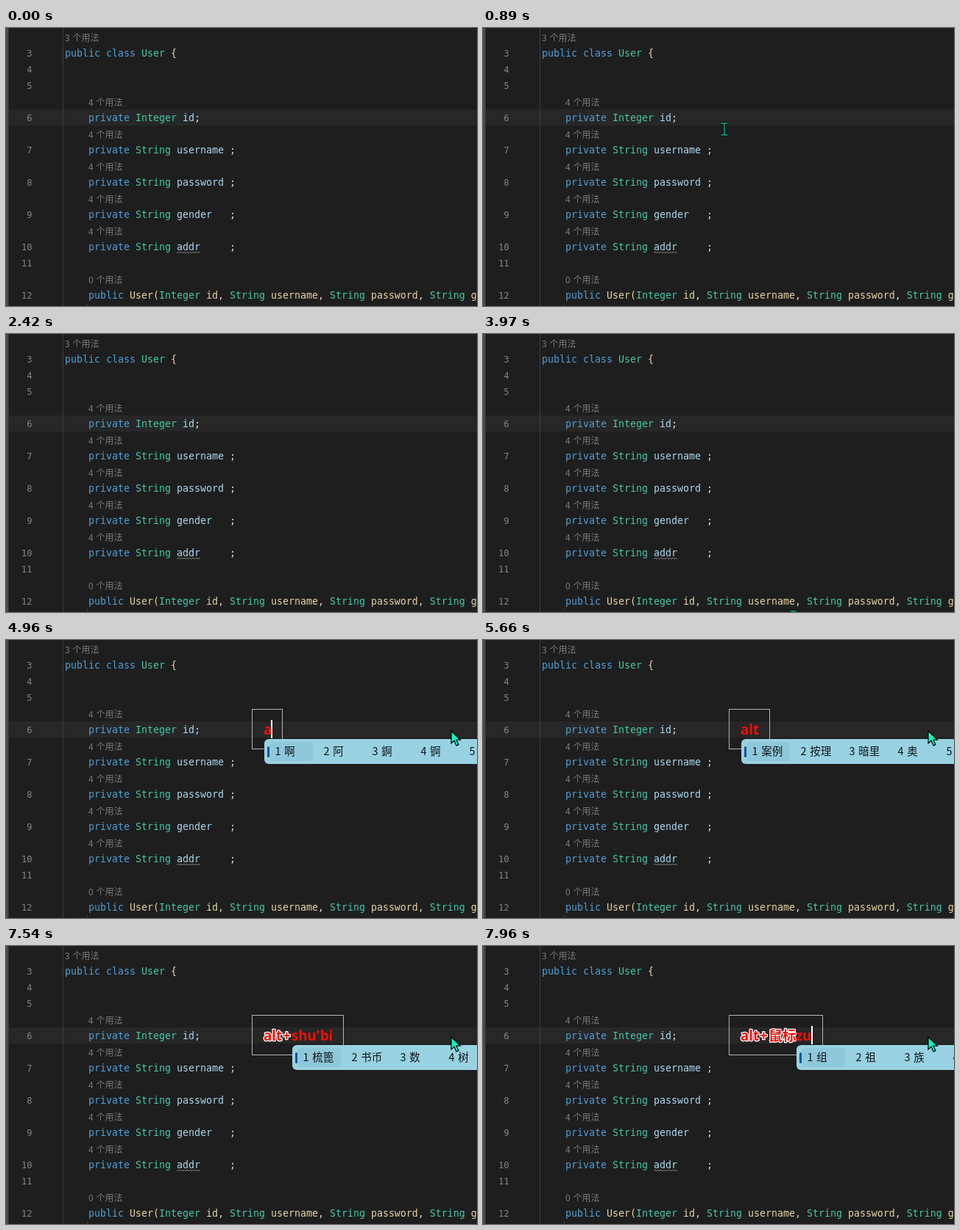
These frames come from a looping animation (640 by 379 pixels, 8000 ms). An HTML page:

```html
<!DOCTYPE html>
<html lang="zh-CN">
<head>
<meta charset="utf-8">
<style>
html, body { margin: 0; width: 100%; height: 100%; overflow: hidden; background: #1e1e1e; }
svg { display: block; }
text { white-space: pre; }
.code { font: 13.29px "DejaVu Sans Mono", monospace; fill: #d8d8d8; }
.num { font: 12px "DejaVu Sans Mono", monospace; fill: #858585; text-anchor: end; }
.hint { font: 12px "Noto Sans CJK SC", sans-serif; fill: #7b7b7b; word-spacing: 1.2px; }
.kw { fill: #4e9fd6; }
.type { fill: #45c8a6; }
.ctor { fill: #e6d6a2; }
.var { fill: #a8daf2; }
.note { font: bold 18.67px "Noto Sans", "Noto Sans CJK SC", sans-serif; fill: #f01008; }
.done { stroke: #fff; stroke-width: 2.6; stroke-linejoin: round; paint-order: stroke; }
.cand { font: 14.5px "Noto Sans CJK SC", sans-serif; fill: #101418; word-spacing: 1.5px; }
</style>
</head>
<body>
<svg width="640" height="379" viewBox="0 0 640 379">
  <rect width="640" height="379" fill="#1e1e1e"/>
  <rect x="4" y="111" width="636" height="22" fill="#272727"/>
  <rect width="3" height="379" fill="#48494b"/>
  <rect x="3" width="1" height="379" fill="#333"/>
  <rect x="77" width="1" height="379" fill="#3d3d3d"/>
  <rect x="110" y="375" width="1" height="4" fill="#3d3d3d"/>
  <g id="editor"></g>
  <path id="wave" fill="none" stroke="#8c8c8c" stroke-width=".9"/>
  <g id="note">
    <rect id="frame" x="334.5" y="94.5" height="54" fill="none" stroke="#b4b4b4"/>
    <text id="done" class="note done" y="129"></text>
    <text id="typing" class="note" y="129"></text>
    <rect id="caret" y="109" width="2" height="25" fill="#fff"/>
    <g id="panel">
      <rect y="135" width="400" height="34" rx="6" fill="#98d2e2"/>
      <rect x="7" y="139" width="59" height="26" rx="5" fill="#8fc8da"/>
      <rect x="4" y="145" width="3" height="15" rx="1.5" fill="#0b56a5"/>
      <g id="cands"></g>
    </g>
  </g>
  <g id="mouse">
    <g id="beam" fill="none" stroke-linecap="square">
      <path d="M-4-8h3l1 1 1-1h3M0-7V7M-4 8h3l1-1 1 1h3" stroke="#000" stroke-width="3"/>
      <path d="M-4-8h3l1 1 1-1h3M0-7V7M-4 8h3l1-1 1 1h3" stroke="#12b890" stroke-width="1.4"/>
    </g>
    <path id="arrow" d="M0 0V17L4 13.3 7 20 10 18.6 7 12.2H12.5Z" fill="#0cf5bb" stroke="#000" stroke-width="1.2"/>
  </g>
</svg>
<script>
const LOOP = 8000;
const $ = id => document.getElementById(id);
const show = (id, on) => $(id).setAttribute('visibility', on ? 'inherit' : 'hidden');

// Editor: [line number or '', indent, text], one row every 22 px
const rows = [
  ['', 0, '3 个用法'], [3, 0, 'public class User {'], [4, 0, ''], [5, 0, ''],
  ['', 4, '4 个用法'], [6, 4, 'private Integer id;'],
  ['', 4, '4 个用法'], [7, 4, 'private String username ;'],
  ['', 4, '4 个用法'], [8, 4, 'private String password ;'],
  ['', 4, '4 个用法'], [9, 4, 'private String gender   ;'],
  ['', 4, '4 个用法'], [10, 4, 'private String addr     ;'], [11, 0, ''],
  ['', 4, '0 个用法'], [12, 4, 'public User(Integer id, String username, String password, String gender']
];
function paint(code) {
  const isConstructor = code.includes('(');
  return code.replace(/\w+|[{(]/g, word => {
    let kind = isConstructor ? 'ctor' : 'var';
    if (/^(public|private|class)$/.test(word)) kind = 'kw';
    else if (/[{(]/.test(word)) kind = 'ctor';
    else if (/^(Integer|String)$/.test(word) || word === 'User' && !isConstructor) kind = 'type';
    return `<tspan class="${kind}">${word}</tspan>`;
  });
}
$('editor').innerHTML = rows.map(([num, indent, text], i) => {
  const x = 80 + indent * 8, y = 17 + i * 22;
  return num === ''
    ? `<text class="hint" x="${x}" y="${y + 1}">${text}</text>`
    : `<text class="num" x="35.5" y="${y}">${num}</text><text class="code" x="${x}" y="${y}">${paint(text)}</text>`;
}).join('');
$('wave').setAttribute('d', 'M232 307' + 'l2-2l2 2'.repeat(8));

// Mouse: [time, x, y]
const path = [
  [0, 218, 405], [50, 218, 405], [220, 249, 285], [380, 248, 289], [740, 329, 138],
  [870, 328, 138], [1050, 322, 129], [1210, 327, 120], [1430, 327, 120], [1540, 338, 119],
  [1780, 339, 119], [2070, 339, 119], [2420, 260, 395], [3950, 423, 391], [4200, 352, 122],
  [4440, 605, 124], [LOOP, 605, 124]
];
function mouseAt(t) {
  const i = path.findIndex(p => p[0] > t);
  const [t0, x0, y0] = path[i - 1], [t1, x1, y1] = path[i];
  const u = (t - t0) / (t1 - t0), k = u * u * (3 - 2 * u);
  return [x0 + (x1 - x0) * k, y0 + (y1 - y0) * k];
}

// Typing: [time, committed parts, text being composed, candidates, caret]
const parts = ['alt', '+', '鼠标'], starts = [350, 375, 388, 425];
const typing = [
  [4200, 0, '', '', 1], [4730, 0, '', '', 0], [4910, 0, 'a', '', 1],
  [4960, 0, 'a', '啊 阿 錒 锕 吖', 1], [5010, 0, 'al', '案例 按理 暗里 奥 爱', 0],
  [5290, 0, 'alt', '案例 按理 暗里 奥 爱', 0], [5710, 1, '', '', 1],
  [6090, 2, '', '', 1], [6380, 2, '', '', 0], [6880, 2, '', '', 1],
  [6970, 2, 's', '', 1], [7020, 2, 's', '是 四 三 岁', 1], [7070, 2, 'sh', '是 上 时 使', 1],
  [7260, 2, 'shu', '书 数 树 属', 1], [7400, 2, "shu'b", '书包 书本 鼠标 数', 0],
  [7540, 2, "shu'bi", '梳篦 书币 数 树', 0], [7630, 2, "shu'bia", '鼠标 数表 数 树', 0],
  [7680, 2, "shu'biao", '鼠标 数表 数 树', 0], [7770, 3, '', '', 0],
  [7910, 3, 'z', '', 0], [7960, 3, 'zu', '组 祖 族 足', 1]
];
let current;
function drawNote(state) {
  if (state === current) return;
  current = state;
  show('note', state);
  if (!state) return;
  const [, count, text, cands, caret] = state, x = starts[count];
  $('done').innerHTML = parts.slice(0, count)
    .map((part, i) => `<tspan x="${starts[i] + (part === '+')}">${part}</tspan>`).join('');
  $('typing').setAttribute('x', x);
  $('typing').textContent = text;
  const width = text ? $('typing').getComputedTextLength() : 0;
  const end = Math.max(x, Math.round(x + width - 0.8));
  $('caret').setAttribute('x', end);
  $('frame').setAttribute('width', end - 319);
  show('caret', caret);
  show('panel', cands);
  $('panel').setAttribute('transform', `translate(${x + 1})`);
  $('cands').innerHTML = cands.split(' ')
    .map((c, i) => `<text class="cand" x="${14.5 + i * 66}" y="157">${i + 1} ${c}</text>`).join('');
}

function draw() {
  const t = performance.now() % LOOP;
  drawNote(typing.filter(s => s[0] <= t).pop() || null);
  const [x, y] = mouseAt(t);
  $('mouse').setAttribute('transform', `translate(${x.toFixed(1)} ${y.toFixed(1)})`);
  show('beam', t < 4200);
  show('arrow', t >= 4200);
  requestAnimationFrame(draw);
}
draw();
</script>
</body>
</html>
```
